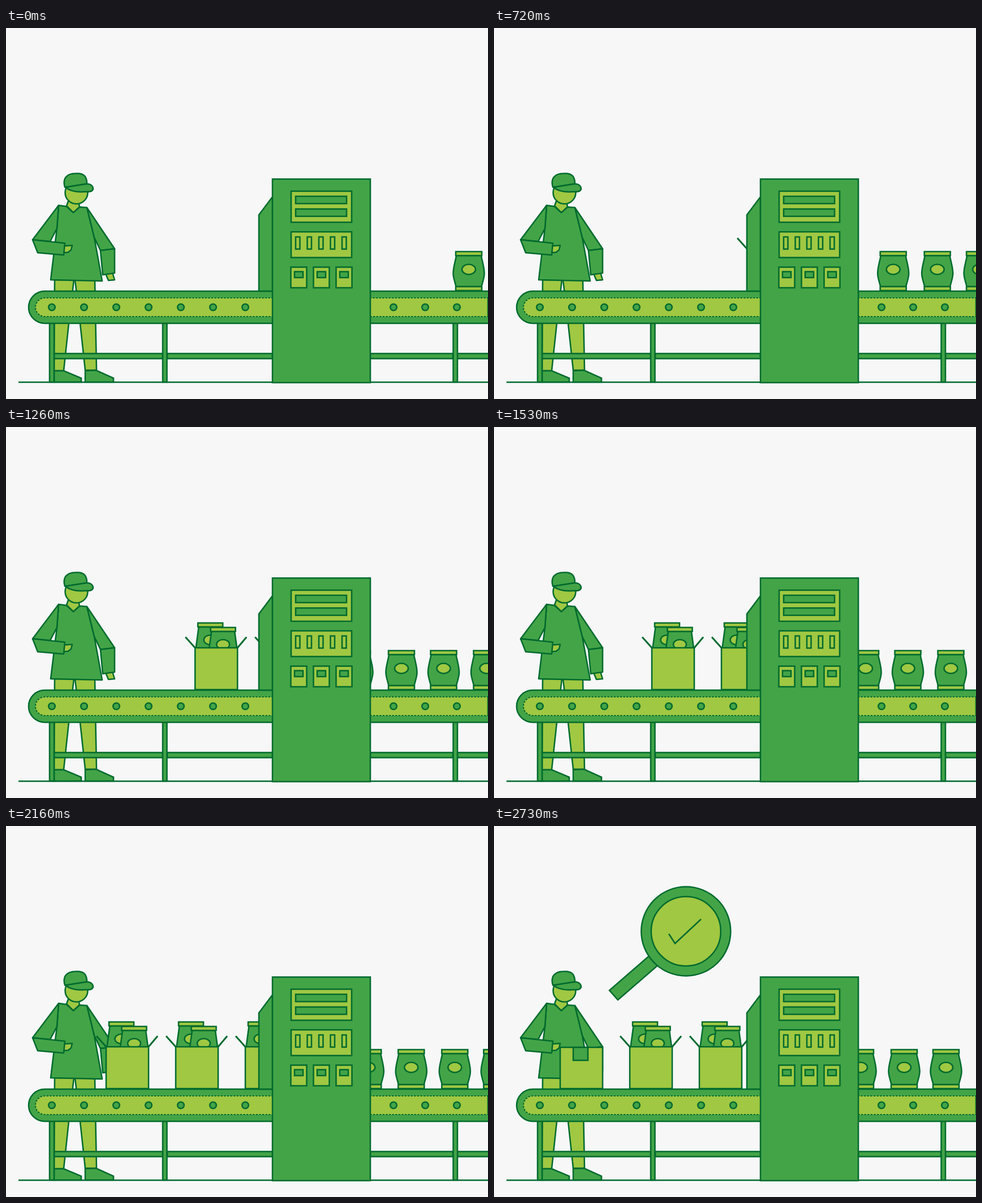
Animation of 852 by 657 pixels, one loop 3600 ms. Source, as an HTML page:

```html
<!DOCTYPE html>
<html lang="en">
<head>
<meta charset="utf-8">
<title>Packing line</title>
<style>
  html, body { margin: 0; width: 100%; height: 100%; overflow: hidden; background: #f7f7f7; }
  svg { display: block; width: 100vw; height: 100vh; }
  .mid { fill: #43a447; }
  .lime { fill: #a0c842; }
  .open { fill: none; }
  .mid, .lime, .open { stroke: #006a2e; stroke-width: 2.5; }
  .dots { stroke-dasharray: 3 2.6; stroke-width: 2.2; }
  .flap { stroke-width: 3; }
</style>
</head>
<body>
<svg viewBox="0 0 852 657">
  <defs>
    <clipPath id="leftSide"><rect width="460" height="657"/></clipPath>
    <clipPath id="rightSide"><rect x="600" width="252" height="657"/></clipPath>
    <g id="bag">
      <path class="mid" d="M-22 403H22C24 415 28 425 27.500 436C27 444 24 451 22.500 458H-22.500C-24 451 -27 444 -27.500 436C-28 425 -24 415 -22 403Z"/>
      <path class="lime" d="M-23 396H23V403H-23ZM-23 458H23V465H-23Z"/>
      <ellipse class="lime" cy="427.500" rx="12" ry="9"/>
    </g>
    <clipPath id="aboveBox"><rect x="-20" y="330" width="120" height="61"/></clipPath>
    <g id="topBag">
      <path class="mid" d="M-20.500 354H20.500L25.500 391V395H-25.500V391Z"/>
      <path class="lime" d="M-22 347H22V354H-22Z"/>
      <ellipse class="lime" cy="377" rx="11.500" ry="8.500"/>
    </g>
    <g id="openBox">
      <g clip-path="url(#aboveBox)">
        <use href="#topBag" x="27"/>
        <use href="#topBag" x="49.500" y="8"/>
      </g>
      <path class="lime" d="M0 391H75V465H0Z"/>
      <path class="open flap" d="M-17 372L0 391M75 391L91 372"/>
    </g>
    <g id="closedBox">
      <path class="lime" d="M0 392H75V465H0Z"/>
      <path class="mid" d="M23 392H49V415H23Z"/>
    </g>
  </defs>

  <g id="legs">
    <path class="lime" d="M86 446H120L111 523L102 607H85ZM122 446H157L160 606H140L131 523Z"/>
    <path class="mid" d="M85 607H102L133 620V627H85ZM140 607L159 606L190 620V627H140Z"/>
  </g>
  <path class="mid" d="M85 576.500H277V585.500H85ZM285 576.500H471V585.500H285ZM644 576.500H790V585.500H644ZM798 576.500H860V585.500H798Z"/>
  <path class="mid" d="M77 523H85V627H77ZM277 523H284.500V627H277ZM790.500 523H798V627H790.500Z"/>
  <path class="open" d="M22 627.300H852"/>
  <g id="belt">
    <path class="mid" d="M870 466H68.500a28.500 28.500 0 0 0 0 57H870Z"/>
    <path class="lime dots" d="M870 478H68.500a16.500 16.500 0 0 0 0 33H870Z"/>
    <path class="open" d="M852 478V511"/>
  </g>

  <g id="worker" stroke-linejoin="round">
    <path class="lime" d="M111 304L107 315L119 327L130 317L128 306Z"/>
    <path class="mid" d="M93 314L107 316L119 327L130 317L143 318L156 371L170 448L79 446L90 355Z"/>
    <path class="mid" d="M93 314L47 375L78 378L90 355Z"/>
    <path class="lime" d="M103 386L117 385L115 393L110 397L102 398Z"/>
    <path class="mid" d="M47 375L104 381L102 402L56 398Z"/>
    <path class="mid" d="M143 318L192 391L167 394L156 371Z"/>
    <path class="lime" d="M176 435L188 433L192 446L181 447Z"/>
    <path class="mid" d="M167 394L192 391V434L171 437Z"/>
    <circle class="lime" cx="124.500" cy="291.500" r="20"/>
    <path class="mid" d="M104 282C100 268 105 257.500 124 257.500C140 257 143 265 143 276Z"/>
    <path class="mid" d="M105 282L143 276C150 276 154 280 154 285C152 291 146 290 138 290C124 291 112 288 105 282Z"/>
  </g>

  <g id="boxes" clip-path="url(#leftSide)"></g>
  <g id="bags" clip-path="url(#rightSide)"></g>

  <g id="machine">
    <path class="mid" d="M447 331L471 299V466H447Z"/>
    <path class="mid" d="M471 267.500H644V628H471Z"/>
    <path class="lime" d="M504 289H611V344H504ZM504 361H611V406.500H504Z"/>
    <path class="mid" d="M512 298H602V311H512ZM512 320.500H602V333.500H512Z"/>
  </g>

  <g id="lens">
    <path class="mid" d="M280 225L204 291L219 308L295 242Z"/>
    <circle class="mid" cx="339.300" cy="186.500" r="79"/>
    <circle class="lime" cx="339.300" cy="186.500" r="61.500"/>
    <path class="open" d="M309 191L320 208L366 165"/>
  </g>
</svg>
<script>
const LOOP = 3600, STEP = 30, STOP = 2730;
// [time, x] of the leading box and of a reference bag
const boxTrack = [[0, 598], [960, 397], [1530, 279], [1890, 212], [2400, 150], [2730, 117]];
const bagTrack = [[0, 1046.5], [450, 976.5], [960, 896.5], [1530, 807.5], [1890, 753], [2400, 685.5], [2730, 648]];
const boxOffsets = [0, 123, 246];
const bagOffsets = [-228.5, -150.5, -76, 0, 77, 151];

const byId = id => document.getElementById(id);

function add(parent, tag, attrs) {
  const el = document.createElementNS('http://www.w3.org/2000/svg', tag);
  for (const key in attrs) el.setAttribute(key, attrs[key]);
  return byId(parent).appendChild(el);
}

const addRect = (cls, x, y, width, height) => add('machine', 'rect', { class: cls, x, y, width, height });

// Smooth curve through the track's points
function along(track, t) {
  const last = track.length - 1;
  let i = 0;
  while (i < last - 1 && t >= track[i + 1][0]) i++;
  const slope = k => {
    const a = track[Math.max(k - 1, 0)], b = track[Math.min(k + 1, last)];
    return (b[1] - a[1]) / (b[0] - a[0]);
  };
  const [t0, x0] = track[i], [t1, x1] = track[i + 1];
  const d = t1 - t0, u = (t - t0) / d, v = 1 - u;
  return v * v * ((1 + 2 * u) * x0 + u * d * slope(i))
       + u * u * ((1 + 2 * v) * x1 - v * d * slope(i + 1));
}

for (let i = 0; i < 7; i++) add('belt', 'circle', { class: 'mid', cx: 81 + 57 * i, cy: 494.5, r: 5.8 });
for (let i = 0; i < 3; i++) {
  add('belt', 'circle', { class: 'mid', cx: 685 + 56 * i, cy: 494.5, r: 5.8 });
  addRect('lime', 503.5 + 40 * i, 423.5, 28, 36.5);
  addRect('mid', 510 + 40 * i, 431.5, 15, 10.5);
}
for (let i = 0; i < 5; i++) addRect('lime', 512 + 20.5 * i, 370, 7.5, 21.5);

const boxes = boxOffsets.map(() => add('boxes', 'use', { href: '#openBox' }));
const bags = bagOffsets.map(() => add('bags', 'use', { href: '#bag' }));

function draw(time) {
  const t = Math.min(Math.floor((time % LOOP) / STEP) * STEP, STOP);
  const done = t === STOP;
  const boxX = along(boxTrack, t), bagX = along(bagTrack, t);
  boxes.forEach((box, i) => box.setAttribute('x', boxX + boxOffsets[i]));
  bags.forEach((bag, i) => bag.setAttribute('x', bagX + bagOffsets[i]));
  boxes[0].setAttribute('href', done ? '#closedBox' : '#openBox');
  byId('lens').style.display = done ? '' : 'none';
}

const start = performance.now();
function tick() {
  draw(performance.now() - start);
  requestAnimationFrame(tick);
}
tick();
</script>
</body>
</html>
```
